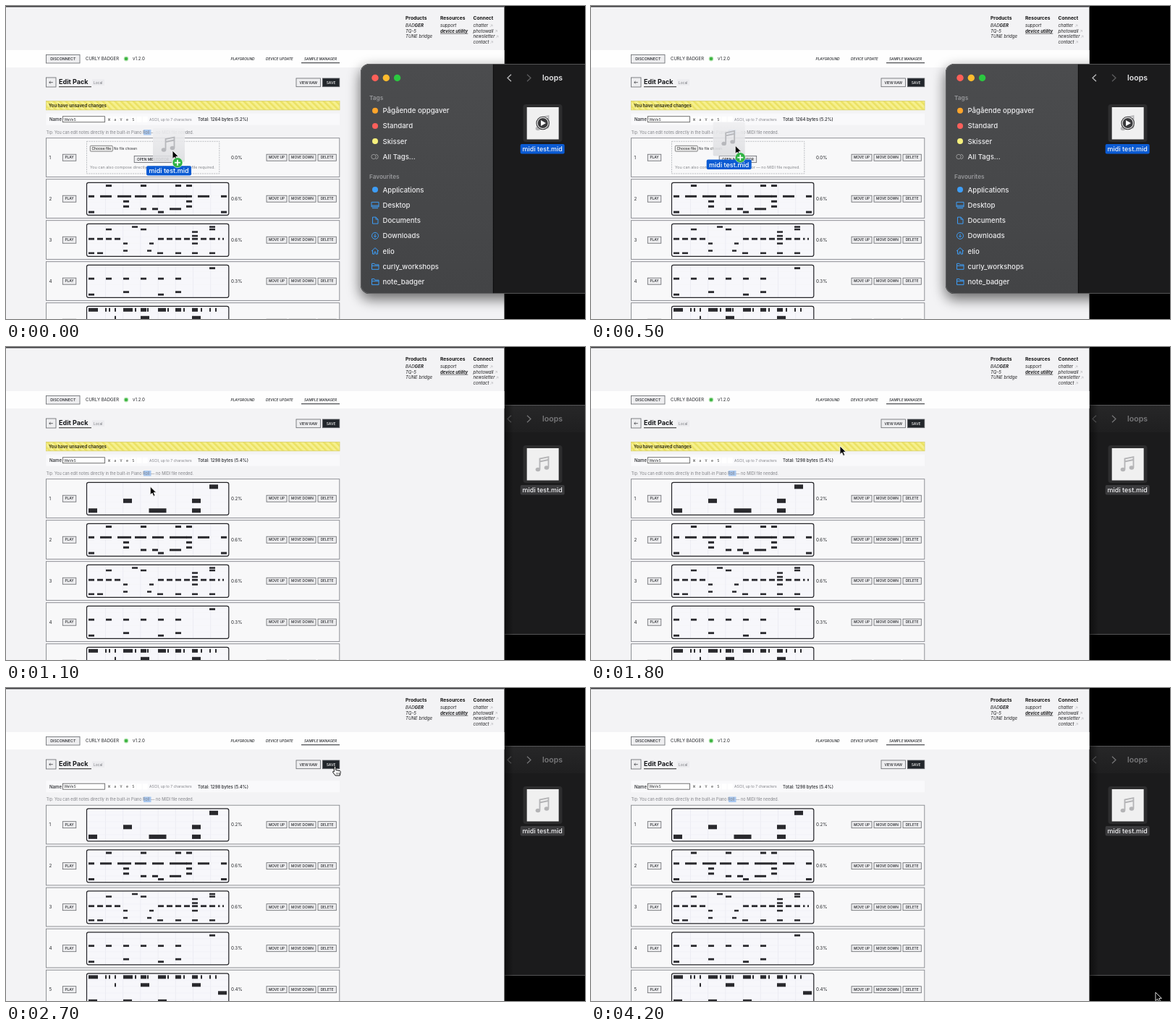
Write an HTML page that moves like this. It is 800 by 433 pixels and loops after 4.5 s.

```html
<!DOCTYPE html>
<html lang="en">
<head>
<meta charset="utf-8">
<title>Edit Pack</title>
<style>
html, body { margin: 0; width: 100%; height: 100%; overflow: hidden; background: #000; }
svg { display: block; width: 100vw; height: 100vh; font-family: Inter, "Liberation Sans", sans-serif; }
text { white-space: pre; }
</style>
</head>
<body>
<svg id="stage" viewBox="0 0 800 433"></svg>
<script>
const LOOP = 4500, STEP = 100;
const DROP = 600, BLUR = 700, PARSED = 800, SAVED = 2700;
const INK = '#24262a', BLUE = '#3d9df6';

// ---- drawing helpers ----
const rect = (x, y, w, h, fill, extra = '') =>
  `<rect x="${x}" y="${y}" width="${w}" height="${h}" fill="${fill}" ${extra}/>`;
const line = (d, stroke, w = 1, extra = '') =>
  `<path d="${d}" fill="none" stroke="${stroke}" stroke-width="${w}" ${extra}/>`;
const dot = (x, y, r, fill, extra = '') =>
  `<circle cx="${x}" cy="${y}" r="${r}" fill="${fill}" ${extra}/>`;
// cy is the middle of the capitals
const text = (x, cy, s, size, fill = INK, extra = '') =>
  `<text x="${x}" y="${(cy + size * 0.36).toFixed(2)}" font-size="${size}" fill="${fill}" ${extra}>${s}</text>`;
const group = (id, body, extra = '') => `<g id="${id}" ${extra}>${body}</g>`;
const MID = 'text-anchor="middle"', ITALIC = 'font-style="italic"';
const weight = w => `font-weight="${w}"`;

const button = (x, y, w, h, label, size = 4.8, fill = '#eeeef0', ink = INK) =>
  rect(x, y, w, h, fill, 'stroke="#63656a" stroke-width=".8"') +
  text(x + w / 2, y + h / 2, label, size, ink, `${MID} ${weight(500)}`);

const note = (x, y, fill) =>
  `<g transform="translate(${x} ${y})">` +
  line('M-4.5 7V-7.5L7.5-10V4.5M-4.5-3.5L7.5-6', fill, 1.8) +
  `<ellipse cx="-7" cy="7.5" rx="3.3" ry="2.7" fill="${fill}"/>` +
  `<ellipse cx="5" cy="5" rx="3.3" ry="2.7" fill="${fill}"/></g>`;

// ---- page ----
function header() {
  const cols = [
    [552, 'Products', ['BAD<tspan font-weight="700">GER</tspan>', 'TQ-5', 'TUNE bridge']],
    [600, 'Resources', ['support', '<tspan font-weight="700" text-decoration="underline">device utility</tspan>']],
    [645.5, 'Connect', ['chatter', 'photowall', 'newsletter', 'contact']]
  ];
  const ends = [669, 675.5, 677, 669.5];
  return cols.map(([x, title, items], c) =>
    text(x, 17, title, 6.7, '#111', weight(700)) +
    items.map((s, i) => {
      const y = 27 + i * 7.6;
      const arrow = c === 2 ? line(`M${ends[i]} ${y + 2}l3-3m-2.4 0h2.4v2.4`, '#b9b9bd', 0.6) : '';
      return text(x, y, s, 6.1, '#1c1c1e', ITALIC) + arrow;
    }).join('')).join('');
}

function nav() {
  const tab = (x, s) => text(x, 73, s, 4.8, INK, `${ITALIC} ${weight(500)}`);
  return rect(0, 61, 688.5, 24, '#fefefe') +
    button(55.5, 67.5, 46.5, 11.5, 'DISCONNECT', 5.3) +
    text(110, 73, 'CURLY BADGER', 6) + dot(166, 73, 3.4, '#bfe8bd') + dot(166, 73, 2.3, '#3fb544') +
    text(175, 73, 'v1.2.0', 6.1) +
    tab(310.5, 'PLAYGROUND') + tab(359, 'DEVICE UPDATE') + tab(412, 'SAMPLE MANAGER') +
    line('M408 78.7H461', INK);
}

function titleBar() {
  return button(55.5, 99, 13.5, 13, '') + line('M64.8 105.7h-5m1.7-1.7l-1.7 1.7l1.7 1.7', INK, 0.7) +
    text(73, 104.6, 'Edit Pack', 9, '#17181b', weight(700)) + line('M73 111.8H118', '#222', 1.1) +
    rect(119, 101.5, 17, 8.5, '#ececef') + text(121, 105.9, 'Local', 4.8, '#77797e') +
    button(401, 100, 33.5, 11.7, 'VIEW RAW') +
    button(437.3, 100, 23.5, 11.7, 'SAVE', 4.9, '#22262b', '#f4f4f4');
}

const banner = () =>
  rect(55.5, 131.5, 405.5, 12.3, 'url(#stripes)', 'stroke="#d8cf6a" stroke-width=".8"') +
  text(59, 137.7, 'You have unsaved changes', 6, '#39371c', weight(700));

function nameBar() {
  const cells = [...'WaVeS  '].map((c, i) =>
    rect(139 + i * 8.3, 152.8, 7, 8, '#fff') +
    text(142.5 + i * 8.3, 156.8, c, 5, '#333', `${MID} font-family="Noto Sans Mono, monospace"`)).join('');
  return rect(55.5, 148.7, 405.5, 16, '#f9f9fb') +
    text(60, 157, 'Name', 6.1, INK, weight(500)) +
    rect(78.5, 152.7, 58, 8, '#fff', 'stroke="#555" stroke-width=".8"') +
    text(80.2, 156.8, 'WaVeS', 5) + cells +
    text(198, 157, 'ASCII, up to 7 characters', 5, '#808287') +
    `<text id="total" x="265" y="159.2" font-size="6" fill="${INK}" font-weight="500"></text>` +
    rect(190, 171, 10.5, 7.5, '#a9c9f2') +
    text(55.5, 174.7, 'Tip: You can edit notes directly in the built-in Piano Roll — no MIDI file needed.', 5.5, '#808287');
}

// Each lane: "y height: x x/width ..." measured from the top of its roll; width 8 unless given
const ROLLS = [
  ['3 6: 281/12', '22.5 6: 162/12 257/12', '36 6: 114/12 197.5/24 257/12'],
  ['2.8 3: 138 186 234 249', '17.5 3: 114 130 138 154 162/11 178 186 202 210 226 234 242 249 265 273 297',
    '24.5 3: 162 249', '31.5 3: 162 249', '35 3: 186 202 226 234', '39.3 3: 114 210 297'],
  ['3 2.5: 174 281', '6.5 2.5: 138 186 281', '10 2.5: 257', '15.5 2.5: 257', '19.5 2.8: 114 126 138 150 210 222 234 246 257 269 281 293/2.5 299/2',
    '26 2.5: 198/6 162/6 257', '36 2.5: 162/6 195/6', '39.3 2.5: 114 126 209 234 257 281'],
  ['3 2.8: 281', '17.5 2.8: 114 138 162 186 210 234', '36 2.8: 162 234', '39.5 2.8: 114 210'],
  ['2.5 5: 114/13 137/2 142/2 150/2 162/13 178/2 186 195/2 210/11 223/2 234 245/2 257 269/2 281/2 289/2',
    '13.5 5: 150/2 186/12 257/12', '24.5 5: 293/12', '36 5: 114/12 162/12 210/12']
];

function roll(i, top) {
  let s = rect(111.5, top, 196.3, 45, '#f7f7fb');
  for (let x = 137.5; x < 307; x += 24.2) s += line(`M${x} ${top}v45`, '#e4e5ee', 0.6);
  for (let y = 9; y < 45; y += 9) s += line(`M112 ${top + y}h196`, '#eeeef5', 0.5);
  for (const lane of ROLLS[i]) {
    const [pos, xs] = lane.split(': '), [y, h] = pos.split(' ').map(Number);
    for (const item of xs.split(' ')) {
      const [x, w = 8] = item.split('/');
      s += rect(x, top + y, w, h, '#29292d');
    }
  }
  return s + rect(111.5, top, 196.3, 45, 'none', 'rx="2.5" stroke="#242428" stroke-width="1.2"');
}

function picker() {
  return rect(111.5, 187.3, 183.3, 44.6, '#f8f8f9', 'stroke="#aeb0b5" stroke-width=".8" stroke-dasharray="2 1.2"') +
    rect(116.3, 193.3, 31, 7.8, '#efefef', 'rx="1" stroke="#555" stroke-width=".7"') +
    text(131.8, 197.1, 'Choose file', 5, '#111', MID) +
    `<text id="file" x="149" y="198.8" font-size="4.7" fill="${INK}"></text>` +
    button(177.2, 207.5, 51.5, 9, 'OPEN MIDI EDITOR') +
    text(116, 222.9, 'You can also compose directly in the editor — no MIDI file required.', 5.44, '#85878c');
}

function rows() {
  const share = ['', '0.6%', '0.6%', '0.3%', '0.4%'];
  return share.map((pct, i) => {
    const y = 182.7 + i * 57, c = y + 27;
    const body = i ? roll(i, y + 4.6) : group('picker', picker()) + group('first', roll(0, y + 4.6));
    return rect(55.5, y, 405.3, 53.7, '#f8f8f9', 'stroke="#85878c" stroke-width=".9"') +
      text(59.5, c, i + 1, 6.2) + button(78.3, c - 4.5, 18.5, 9, 'PLAY') + body +
      (i ? text(311, c, pct, 6.2) : `<text id="share" x="311" y="211.9" font-size="6.2" fill="${INK}"></text>`) +
      button(360, c - 4.5, 28, 9, 'MOVE UP') + button(391, c - 4.5, 37, 9, 'MOVE DOWN') +
      button(431, c - 4.5, 25.3, 9, 'DELETE');
  }).join('');
}

// ---- file window ----
function sidebar() {
  const label = (y, s) => text(520.5, y, s, 9.6, '#ececee', weight(500));
  const head = (y, s) => text(502, y, s, 8.2, '#97989b', weight(600));
  const tags = [['#ffa52b', 'Pågående oppgaver'], ['#fb5f5b', 'Standard'], ['#f6f07c', 'Skisser']];
  const folder = 'M505.5 4h9.5v-6.5h-5l-1-1.5h-3.5zM505.5-1h9.5';
  const places = [
    ['Applications', ''],
    ['Desktop', 'M505-4h10v6.5h-10zM505 .8h10M506 4.3h8'],
    ['Documents', 'M506.5-4.5h4.5l3 3v6h-7.5zM511-4.5v3h3'],
    ['Downloads', 'M505.5 0a4.5 4.5 0 1 0 9 0a4.5 4.5 0 1 0 -9 0M510-2.5v4.5m-1.8-1.8l1.8 1.8l1.8-1.8'],
    ['elio', 'M505 0l5-4.5l5 4.5M506.5-1v5h2.5v-3h2v3h2.5v-5'],
    ['curly_workshops', folder], ['note_badger', folder]
  ];
  return rect(490, 80, 183, 318, 'url(#side)') +
    ['#fe5f58', '#febb2e', '#2bc840'].map((c, i) => dot(510 + i * 15.3, 99.5, 4.7, c)).join('') +
    head(127, 'Tags') +
    tags.map(([c, s], i) => dot(510, 144.7 + i * 21.2, 4, c) + label(144.7 + i * 21.2, s)).join('') +
    dot(508, 208.5, 3.2, 'none', 'stroke="#aaa" stroke-width=".8"') +
    line('M511 205.3a3.2 3.2 0 1 1 0 6.4', '#aaa', 0.8) + label(208.5, 'All Tags...') +
    head(236.5, 'Favourites') +
    places.map(([s, d], i) => {
      const y = 254.1 + i * 21.25;
      const icon = d ? `<g transform="translate(0 ${y})">${line(d, BLUE, 1)}</g>` : dot(510, y, 4, BLUE);
      return icon + label(y, s);
    }).join('');
}

function finder() {
  const play = dot(741.7, 162, 9.3, '#39393b') + dot(741.7, 162, 7.6, 'none', 'stroke="#e8e8e8" stroke-width="1.2"') +
    '<path d="M739 158v8l7-4z" fill="#fff"/>';
  return rect(490, 80, 310, 318, '#1b1b1c') +
    group('bar', rect(673, 80, 127, 38, 'url(#barFill)')) + sidebar() +
    line('M673.3 80V398', '#0c0c0d') +
    line('M698 94.7l-5 4.8l5 4.8', '#b9b9bb', 1.3, 'id="back"') +
    line('M720 94.7l5 4.8l-5 4.8', '#5c5c5e', 1.3, 'id="next"') +
    text(741, 99.3, 'loops', 10.6, '#e6e6e8', `id="folder" ${weight(600)}`) +
    rect(714.5, 136, 54, 52, '#2d2d2e', 'rx="4"') + rect(719.7, 140, 44, 44.5, '#f0f0f0') +
    note(742, 162, '#b4b4b6') + group('play', play) +
    rect(710.7, 191, 61, 13.4, '#0b5bd3', 'id="pill" rx="2"') +
    text(741.2, 197.7, 'midi test.mid', 9, '#f4f4f6', `${MID} ${weight(500)}`) +
    line('M800 80.4H502a12 12 0 0 0 -11.6 12V386a12 12 0 0 0 12 11.6H800', '#6b6c6e', 0.8);
}

const ghost = () =>
  rect(-22, -23.5, 44, 47, 'url(#paper)', 'rx="2" opacity=".88"') + note(0, -1, '#b7b8bc') +
  rect(-31, 28.7, 62, 13.4, '#0b5bd3', 'rx="2"') +
  text(0, 35.4, 'midi test.mid', 9, '#fff', `${MID} ${weight(500)}`);

const ARROW = '<path d="M0 0V11.6L2.7 9.1L4.6 13.4L6.7 12.5L4.8 8.3H8.4Z" fill="#000" stroke="#f4f4f4" stroke-width=".9"/>';
const HAND = '<path d="M-1.2.8Q0-.6 1.2.8V5L7 6.2Q8 6.6 7.7 8L6.8 12.6H.6L-3 8Q-3.4 6.4-1.2 7.4Z" fill="#fff" stroke="#111" stroke-width="1"/>' +
  line('M2.2 8.5v2.6M4 8.5v2.6M5.8 8.5v2.6', '#111', 0.6);
const PLUS = dot(7, 16.7, 7, '#2fb344', 'stroke="#e9f7ea" stroke-width=".6"') + line('M3 16.7h8M7 12.7v8', '#fff', 1.7);

const defs = `<defs>
<pattern id="stripes" width="6" height="6" patternUnits="userSpaceOnUse" patternTransform="rotate(-45)">
${rect(0, 0, 6, 6, '#f6f08e')}${rect(0, 0, 2.6, 6, '#ebe163')}</pattern>
<linearGradient id="side" x2="0" y2="1"><stop stop-color="#4b4c4e"/><stop offset="1" stop-color="#434446"/></linearGradient>
<linearGradient id="barFill" x2="0" y2="1"><stop stop-color="#272728"/><stop offset="1" stop-color="#1f1f20"/></linearGradient>
<linearGradient id="paper" x2="0" y2="1"><stop stop-color="#efeff1"/><stop offset="1" stop-color="#dcdde0"/></linearGradient>
<linearGradient id="edge"><stop stop-color="#000" stop-opacity=".45"/><stop offset="1" stop-color="#000" stop-opacity="0"/></linearGradient>
<filter id="soft" x="-20%" y="-20%" width="140%" height="140%"><feGaussianBlur stdDeviation="9"/></filter>
<clipPath id="window">${rect(490, 80, 330, 318, '#000', 'rx="12"')}</clipPath>
<clipPath id="behind">${rect(689, 0, 111, 433, '#000')}</clipPath>
</defs>`;

const svg = document.getElementById('stage');
svg.innerHTML = defs + rect(0, 0, 800, 433, '#000') +
  rect(0, 0, 688.5, 433, '#f3f3f5') + rect(0, 0, 688.5, 1.5, '#3a3a3d') +
  header() + nav() + titleBar() + group('banner', banner()) + group('list', nameBar() + rows()) +
  group('shadow', rect(489, 86, 320, 320, '#000', 'rx="14" opacity=".55" filter="url(#soft)"')) +
  group('finder', `<g clip-path="url(#window)">${finder()}</g>`) +
  group('edgeShade', rect(689, 80, 12, 318, 'url(#edge)')) +
  group('ghost', ghost()) +
  group('cursor', group('arrow', ARROW) + group('hand', HAND) + group('plus', PLUS));

// ---- motion ----
const el = id => document.getElementById(id);
const show = (id, on) => el(id).setAttribute('display', on ? 'inline' : 'none');
const move = (id, x, y) => el(id).setAttribute('transform', `translate(${x.toFixed(2)} ${y.toFixed(2)})`);
const ease = {
  in: k => k * k,
  out: k => 1 - (1 - k) * (1 - k),
  both: k => k * k * (3 - 2 * k)
};
const PATH = [
  [0, 230, 200], [500, 199.3, 193, 'out'], [1300, 199.3, 193, 'both'], [1800, 344, 137, 'in'],
  [2500, 454.5, 108.5, 'out'], [3500, 454.5, 108.5, 'both'], [4100, 780, 421, 'both']
];

function at(t) {
  for (let i = 1; i < PATH.length; i++) {
    const [t0, x0, y0] = PATH[i - 1], [t1, x1, y1, kind] = PATH[i];
    if (t <= t1) {
      const k = ease[kind]((t - t0) / (t1 - t0));
      return [x0 + (x1 - x0) * k, y0 + (y1 - y0) * k];
    }
  }
  return PATH[PATH.length - 1].slice(1);
}

function draw(t) {
  const drag = t < DROP, active = t < BLUR, parsed = t >= PARSED, saved = t >= SAVED;
  const [x, y] = at(t);
  const hand = x > 437 && x < 461 && y > 100 && y < 112;

  move('cursor', x, y);
  show('arrow', !hand);
  show('hand', hand);
  show('plus', drag);
  show('ghost', drag);
  const lag = ease.out(Math.min(t / 500, 1));
  move('ghost', 225 - 34.3 * lag, 192.5 - 8.6 * lag);

  show('shadow', drag);
  show('edgeShade', !drag);
  if (drag) el('finder').removeAttribute('clip-path');
  else el('finder').setAttribute('clip-path', 'url(#behind)');
  show('bar', !active);
  show('play', active);
  el('pill').setAttribute('fill', active ? '#0b5bd3' : '#3b3b3d');
  el('folder').setAttribute('fill', active ? '#e6e6e8' : '#777779');
  el('back').setAttribute('stroke', active ? '#b9b9bb' : '#59595b');
  el('next').setAttribute('stroke', active ? '#5c5c5e' : '#747476');

  show('picker', !parsed);
  show('first', parsed);
  el('file').textContent = drag ? 'No file chosen' : 'midi test.mid';
  el('total').textContent = parsed ? 'Total: 1298 bytes (5.4%)' : 'Total: 1264 bytes (5.2%)';
  el('share').textContent = parsed ? '0.2%' : '0.0%';
  show('banner', !saved);
  move('list', 0, saved ? -20.5 : 0);
}

const start = performance.now();
function tick() {
  const t = (performance.now() - start) % LOOP;
  draw(Math.floor(t / STEP) * STEP);
  requestAnimationFrame(tick);
}
tick();
</script>
</body>
</html>
```
